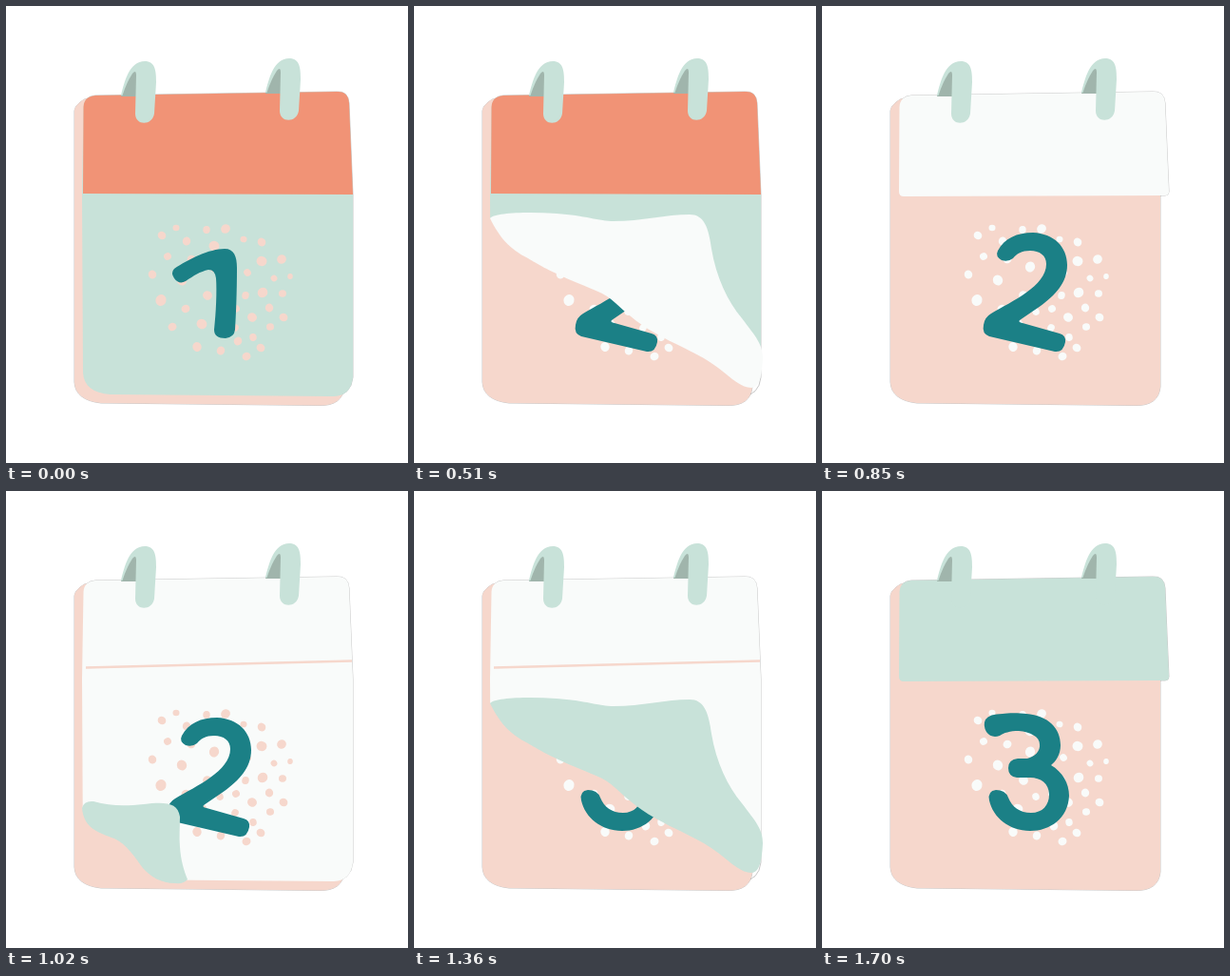
An HTML page that plays this animation: 423 by 480 pixels, repeating every 1870 ms.

```html
<!DOCTYPE html>
<html lang="en">
<head>
<meta charset="utf-8">
<title>Tear-off calendar</title>
<style>
html, body { margin: 0; width: 100%; height: 100%; overflow: hidden; background: #fff; }
svg { display: block; width: 423px; height: 480px; }
</style>
</head>
<body>
<svg id="stage" viewBox="0 0 423 480"></svg>
<script>
const STEP = 170, STEPS = 11;
const CORAL = '#f19376', MINT = '#c8e2d9', PINK = '#f6d7cc',
      WHITE = '#f9fbfa', TEAL = '#1b8086', SHADE = '#a0b5ac', EDGE = '#77777766';

const TOP = 'M81.5 106Q82 95 94 94L348 90Q360 89 361 102L363 150';
const PAD = 'M72 110Q72 106 78 101Q82 97 88 97L340 97L356 110L356 400Q354 420 330 419.5L100 417Q73 414 72 395Z';
const PAGE = TOP + 'L365 198L365 390Q363 409 345 410L110 408Q82 406 81 385L80 197Z';
const HEADER = TOP + 'L365 198L81 197Z';
const FLAP = TOP + 'L365 195Q365 199 361 199L86 200Q81 200 81 195Z';
const RING = 'M121 94C125 78 130 58 146 58C157 58 158 68 158 80L156 113C154 126 136 126 136 113' +
             'L137 73Q137 66 133 71Q127 80 122.5 94Z';

const DIGITS = [
  'M177 276C192 266 214 255 230 255C240 255 243 263 243 275C243 300 242 325 241 340Q240 348 231 349' +
  'Q219 349 219 340C221 322 222 300 221 286Q220 277 213 277C204 279 198 283 189 289Q182 293 177 286Q173 280 177 276Z',
  'M185 257C192 244 205 238 222 238C244 239 258 253 258 272C258 291 245 304 230 315L208 330Q206 332 211 333' +
  'L250 344Q257 346 256 353Q254 364 245 363L176 347Q168 344 170 335Q171 327 178 323' +
  'C200 310 236 294 236 271C236 262 229 257 219 257C210 257 205 260 201 265Q196 269 189 267Q182 263 185 257Z',
  'M172 240Q176 234 190 234C195 233 208 233 215 234C238 236 251 249 251 267C251 277 246 284 241 288' +
  'C253 295 260 307 260 320C259 344 240 357 219 357C197 357 180 343 176 325Q174 315 183 314Q193 314 196 322' +
  'C200 332 208 338 220 338C232 338 239 330 239 319C239 307 230 301 219 301L205 301Q196 300 196 291' +
  'Q196 282 206 281L216 281C224 279 230 273 229 266C229 258 219 253 207 252C198 252 191 254 187 257' +
  'Q178 260 173 253Q169 246 172 240Z'
];

// x, y, radius
const DOTS = `179 233 3.5,164 241 4.5,211 235 4,231 234 5,250 245 3.5,269 248 4.5,190 247 4.5,170 263 4,
219 252 5.5,154 282 4.5,163 309 6,189 318 4.5,206 334 5.5,201 358 5,226 362 4.5,253 368 4.5,268 359 4.5,
260 348 4,244 352 4.5,278 337 4,292 327 4.5,277 317 4.5,270 301 5.5,291 302 4,282 286 3.5,299 284 3,
290 266 5,269 268 5.5,254 280 4,252 304 4,242 318 4,259 327 5,185 288 5.5,219 274 5.5,195 266 4.5,
212 304 5,225 321 4,241 338 4`.split(',').map(d => d.trim().split(' ').map(Number));

// Each stage of the turn: the curled sheet and the part of the page still lying flat
const CURL_TOP = 'M80 223C85 217 120 216 150 218C180 220 195 226 210 226C240 226 265 219 290 219';
const CURLS = [
  { fold: 'M80 333Q82 325 92 326C110 331 125 331 145 329C167 326 181 327 183 342C183 353 182 364 183 374' +
          'C184 388 187 398 191 408Q187 413 178 412C163 412 152 405 144 396C135 384 128 372 114 365C98 359 82 355 80 333Z',
    keep: 'M60 335L82 335L130 345L165 385L187 409L187 440L440 440V0H60Z' },
  { fold: CURL_TOP + 'C305 219 311 232 311 250C310 270 306 280 305 300C304 320 299 335 301 350' +
          'C304 375 310 390 309 402Q308 406 303 404C285 396 265 383 250 368C240 355 240 340 230 331' +
          'C218 320 210 307 195 300C170 289 140 277 120 265C100 255 90 243 80 223Z',
    keep: 'M60 223L82 223L200 250L280 350L307 404L307 440L440 440V0H60Z' },
  { fold: CURL_TOP + 'C305 219 310 232 313 255C318 285 330 310 345 328C360 348 367 355 367 370' +
          'C366 390 363 401 355 401C345 401 335 392 320 380C300 365 280 358 262 348C240 337 225 324 212 312' +
          'C200 300 185 297 165 288C140 277 130 271 120 265C100 255 90 243 80 223Z',
    keep: 'M60 223L82 223L250 290L355 385L440 370V0H60Z' },
  { fold: 'M80 222C81 200 82 180 92 165C105 142 145 131 180 127C215 124 240 118 260 110C275 103 290 103 310 104' +
          'C325 106 345 125 354 143C361 160 364 180 366 205C367 225 364 243 357 248C345 250 320 254 290 257' +
          'C255 260 225 267 195 267C160 266 120 260 100 246C90 240 82 232 80 222Z',
    keep: 'M60 200H440V0H60Z' }
];

const path = (d, fill, more = '') => `<path d="${d}" fill="${fill}" ${more}/>`;
const outline = d => path(d, 'none', `stroke="${EDGE}" stroke-width="1"`);

function print(n, dotColor) {
  const spots = n ? DOTS : [...DOTS, [175, 337, 4.5]];
  const dots = spots.map(([x, y, r], i) =>
    `<ellipse cx="${x}" cy="${y}" rx="${r}" ry="${r * .93}" transform="rotate(${i * 47 % 180} ${x} ${y})"/>`);
  return `<g fill="${dotColor}">${dots.join('')}</g>` + path(DIGITS[n], TEAL);
}

function sheet(n) {
  const head = n ? path('M84 185.5L364 178.5', 'none', `stroke="${PINK}" stroke-width="2.6"`) : path(HEADER, CORAL);
  return path(PAGE, n ? WHITE : MINT) + head + print(n, PINK);
}

const ring = (x, y) => `<g transform="translate(${x} ${y})">` +
  path('M121 95Q129 70 137 66L138 95Z', SHADE) + path(RING, MINT) + '</g>';
const RINGS = ring(0, 0) + ring(152, -3);

function draw(step) {
  // First sheet: flat, four curls, flipped. Second sheet: four curls, flipped.
  const n = step < 6 ? 0 : 1;
  const stage = n ? step - 5 : step;
  const back = n ? MINT : WHITE;
  // Outlines lie beneath the fills, so only the outer silhouette shows
  const pad = outline(PAD) + outline(stage < 4 ? PAGE : FLAP) + path(PAD, PINK);
  if (stage === 0) return pad + sheet(n) + RINGS;
  const base = pad + print(n + 1, WHITE);
  if (stage === 5) return base + path(FLAP, back) + RINGS;
  const { fold, keep } = CURLS[stage - 1];
  return `<clipPath id="keep"><path d="${keep}"/></clipPath>` + base +
    `<g clip-path="url(#keep)">${sheet(n)}</g>` + RINGS + path(fold, back);
}

const svg = document.getElementById('stage');
const scenes = Array.from({ length: STEPS }, (_, i) => draw(i));
let shown = -1;

function tick() {
  const step = Math.floor(performance.now() / STEP) % STEPS;
  if (step !== shown) svg.innerHTML = scenes[shown = step];
  requestAnimationFrame(tick);
}
tick();
</script>
</body>
</html>
```
